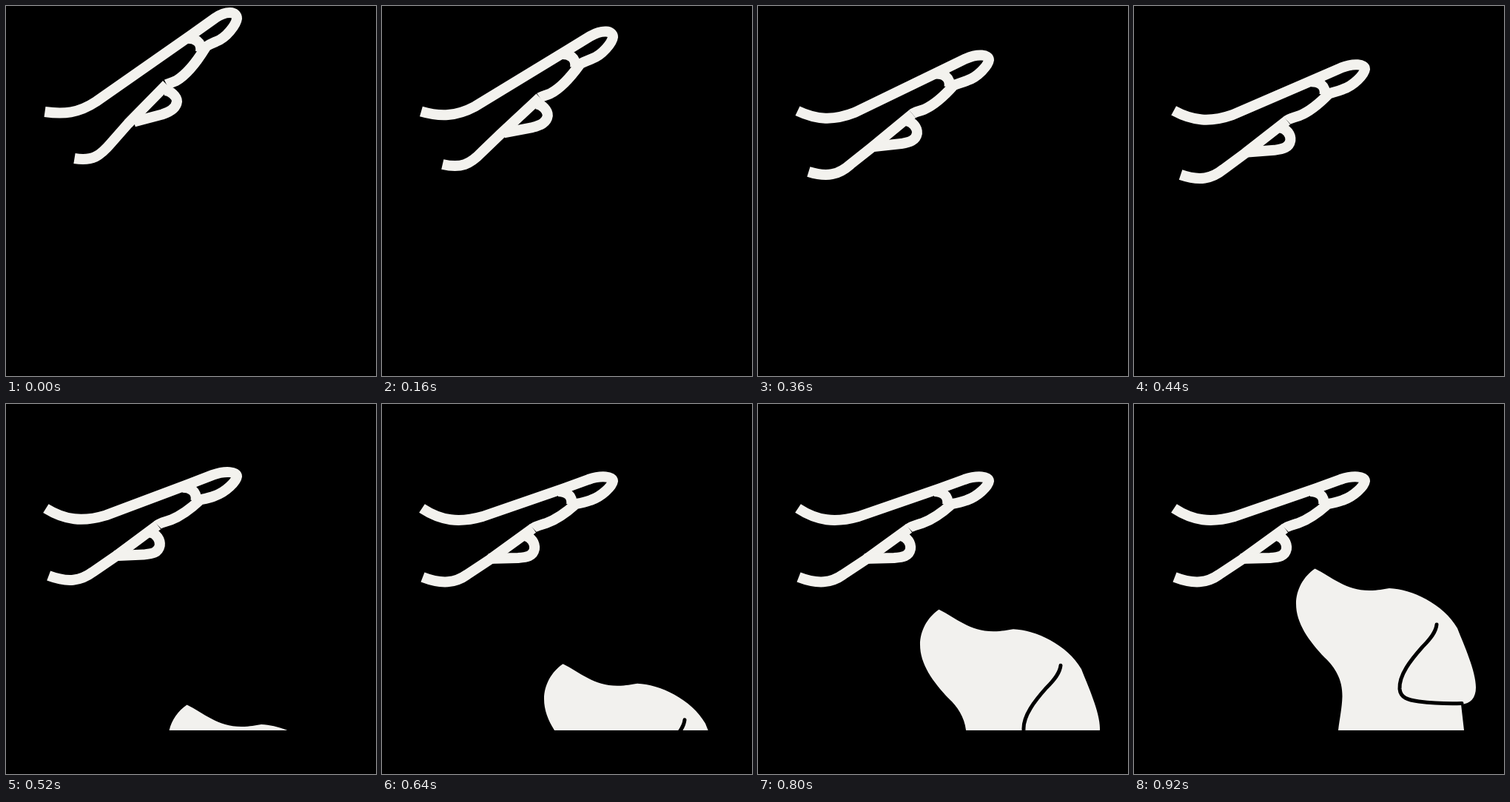
Recreate the animation shown at these times as an HTML page. Size 500 by 500 pixels, loop 4800 ms.

```html
<!DOCTYPE html>
<html lang="en">
<head>
<meta charset="utf-8">
<title>Hand and dog</title>
<style>
  html, body { margin: 0; width: 100%; height: 100%; overflow: hidden; background: #000; }
  svg { display: block; width: 100%; height: 100%; }
</style>
</head>
<body>
<svg viewBox="0 0 500 500">
  <defs>
    <clipPath id="floor"><rect width="500" height="441"/></clipPath>
  </defs>
  <g clip-path="url(#floor)">
    <g id="dog">
      <path fill="#f2f1ee" d="M244.500 222.500 C268 234 286 252 318 252 C331 252 336 250 345 249
        C375 250 418 270 437 303 C446 326 462 361 462 383 C462 397 455 405 442 406
        L446 441 H276 C278 424 281 412 281.500 395 C282 372 271 355 258 343
        C236 320 219 296 219 270 C219 251 229 233 244.500 222.500 Z"/>
      <path fill="none" stroke="#000" stroke-width="5" stroke-linecap="round"
        d="M409 298 C408 308 401 317 390 328 C374 346 358 366 359 385 C360 397 370 400 385 402 C405 404.500 425 405 443 404.500"/>
    </g>
  </g>
  <g id="hand" fill="none" stroke="#f3f2ee" stroke-width="14" stroke-linejoin="round"></g>
</svg>
<script>
const LOOP = 4800, STEP = 40;
const HAND_END = 560, DOG_END = 920, DOG_SPEED = 0.46;

// Each stroke: raised pose, lowered pose.
const strokes = [
  { // fingers and palm edge
    from: "M52.5 143 C78 146.5 98 145 122 129 L250 39.5 L283 16 C298 6 312 7 312 17 C311 25 298 43 284 48 C278 51 271 53 269 57 C261 70 247 91 230 101 C223 104 219 105 217 106",
    to: "M54 141 C80 158 104 161 136 152 L246 114 L279 102 C297 96 312 98 312 104 C311 111 297 125 282 130 C274 133 268 134 262 135 C252 144 236 156 222 161 C213 164 207 165 204 168"
  },
  { // underside of the wrist
    from: "M217 106 L165 159 L143 184 C127 203 117 210 92.5 206",
    to: "M204 168 L146 210 L115 230.5 C99 242 81 244 55 234"
  },
  { // line between the fingers
    from: "M243 44 C255 43 265 48 263 62",
    to: "M238 118 C248 118 258 123 256 136"
  },
  { // thumb
    from: "M214 114 C222 114 231 122 231 129 C230 138 222 143 211 146.5 L173 156.5",
    to: "M193 178 C202 180 207 188 206 196 C204 206 196 207 184 208 L144 209"
  }
];

const hand = document.getElementById("hand");
const dog = document.getElementById("dog");

for (const stroke of strokes) {
  stroke.node = document.createElementNS("http://www.w3.org/2000/svg", "path");
  stroke.target = stroke.to.match(/[\d.]+/g).map(Number);
  hand.append(stroke.node);
}

function blend({ from, target }, amount) {
  let i = 0;
  return from.replace(/[\d.]+/g, n => (+n + (target[i++] - n) * amount).toFixed(2));
}

function draw(time) {
  const t = Math.floor(time % LOOP / STEP) * STEP;
  const lowered = Math.min(1, t / HAND_END);
  for (const stroke of strokes) stroke.node.setAttribute("d", blend(stroke, lowered));
  const drop = Math.max(0, DOG_END - t) * DOG_SPEED;
  dog.setAttribute("transform", `translate(0 ${drop})`);
}

const start = performance.now();
function tick() {
  draw(performance.now() - start);
  requestAnimationFrame(tick);
}
tick();
</script>
</body>
</html>
```
